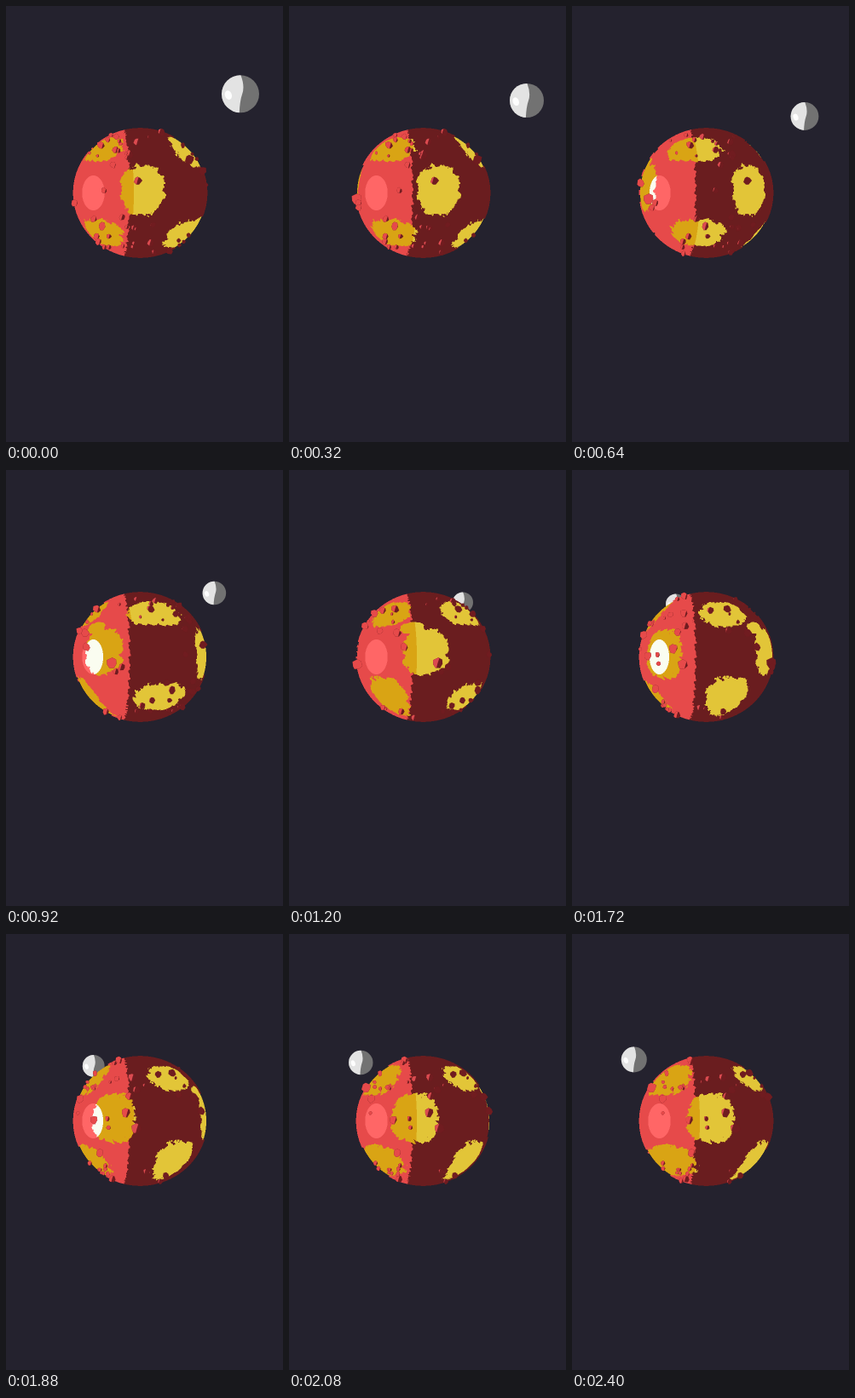
These frames come from a looping animation (325x512 px, 2.44 s). An HTML page with a canvas:

```html
<!DOCTYPE html>
<html lang="en">
<head>
<meta charset="utf-8">
<title>Red planet</title>
<style>
html, body { margin: 0; width: 100%; height: 100%; overflow: hidden; background: #24222e; }
canvas { display: block; width: 325px; height: 512px; }
</style>
</head>
<body>
<canvas id="stage" width="325" height="512"></canvas>
<script>
const LOOP = 2440, STEP = 40, DEG = Math.PI / 180;
const CX = 157.5, CY = 219.5, RX = 77.5, RY = 75;
const ctx = document.getElementById('stage').getContext('2d');

// time, planet yaw, moon x, moon y, moon radius
const keys = [
  [0, 0, 275, 103.3, 22],
  [320, 12, 279, 111, 20],
  [640, 41, 273, 129.5, 16.4],
  [1200, 114, 204, 155.5, 12],
  [1720, 181, 122, 157.5, 12],
  [2080, 216, 84.3, 151, 14.2],
  [2400, 228, 72.8, 147.5, 15]
];

// yellow seas: longitude, latitude, half width, half height
const seas = [
  [2, 3, 19, 23], [-112, 5, 20, 21], [-224, 3, 21, 22],
  [-57, 45, 34, 15], [78, 42, 34, 18], [-160, 44, 29, 15], [-283, 44, 33, 17],
  [-125, 27, 12, 6],
  [-52, -40, 31, 16], [64, -42, 31, 17], [-157, -42, 24, 24], [-273, -40, 33, 18]
];

// longitude, latitude, size
const bigRocks = [
  [-2, 11, 5.5], [-33, 2, 4], [60, 31, 6], [-27, 26, 4], [-30, 42, 4.5],
  [-5, 52, 4.5], [-12, 37, 5], [-42, -31, 5], [-50, -24, 4], [-6, -33, 4.5],
  [14, -51, 4], [-17, -22, 4], [-101, -6, 7], [-92, -9, 4], [88, 20, 5],
  [-48, 61, 4], [-62, 48, 5], [-62, -42, 4], [-98, -13, 4], [-153, 48, 5],
  [-139, 22, 5.5], [-159, 24, 4.5], [-131, 9, 5], [-73, -49, 4], [-211, 7.5, 6],
  [-228, 2, 3], [-227, -6, 3], [-243, 1, 5], [-202, -7, 6.5], [-209, 23, 4.5],
  [-202, 29, 5], [-176, 46, 4.5], [-243, -30, 5], [-152, -58, 4], [-226, 41, 3.5],
  [-208, 43, 4.5], [-274, 71, 4.5], [-272, -64, 4.5], [-269, 7, 2.5]
];

let seed = 29;
const rnd = () => (seed = seed * 16807 % 2147483647) / 2147483647;

function makeRock([lon, lat, size]) {
  const pts = [];
  for (let i = 0; i < 7; i++) {
    const a = i / 7 * Math.PI * 2 + rnd() * .4, r = size * (.8 + rnd() * .35);
    pts.push([Math.cos(a) * r * .88, Math.sin(a) * r]);
  }
  return { lon, lat, size, pts, bias: rnd() * .4 - .2 };
}

const rocks = bigRocks.map(makeRock);
for (let i = 0; i < 46; i++) {
  const lat = (28 + rnd() * 42) * (i % 2 ? 1 : -1);
  rocks.push(makeRock([rnd() * 360, lat, 1.8 + rnd() * 1.5]));
}

// Cubic interpolation through the key table
const slope = (i, k) => (keys[i + 1][k] - keys[i][k]) / (keys[i + 1][0] - keys[i][0]);
function tangent(i, k) {
  const last = keys.length - 1;
  if (i === 0) return 1.5 * slope(0, k) - .5 * tangent(1, k);
  if (i === last) return 1.5 * slope(last - 1, k) - .5 * tangent(last - 1, k);
  const a = keys[i][0] - keys[i - 1][0], b = keys[i + 1][0] - keys[i][0];
  return (slope(i - 1, k) * b + slope(i, k) * a) / (a + b);
}
function track(t, k) {
  let i = 0;
  while (i < keys.length - 2 && t >= keys[i + 1][0]) i++;
  const h = keys[i + 1][0] - keys[i][0], s = (t - keys[i][0]) / h, r = 1 - s;
  return keys[i][k] * (1 + 2 * s) * r * r + keys[i + 1][k] * s * s * (3 - 2 * s)
    + h * (tangent(i, k) * s * r * r - tangent(i + 1, k) * s * s * r);
}

// Land map, two cells per degree
const land = new Uint8Array(720 * 360);
const wrap = d => ((d % 360) + 540) % 360 - 180;
for (let y = 0; y < 360; y++) {
  for (let x = 0; x < 720; x++) {
    const lon = x / 2, lat = 90 - y / 2, a = lon * DEG, b = lat * DEG;
    const rough = .08 * Math.sin(9 * a + 5 * Math.sin(8 * b))
      + .07 * Math.sin(23 * b + 4 * Math.sin(13 * a))
      + .05 * Math.sin(41 * a + 3 * Math.sin(37 * b))
      + .04 * Math.sin(67 * b + 3 * Math.sin(53 * a));
    const wet = seas.some(([u, v, w, h]) =>
      Math.abs(wrap(lon - u) / w) ** 2.6 + Math.abs((lat - v) / h) ** 2.6 < 1 + rough * 1.6);
    land[y * 720 + x] = wet ? 0 : 1;
  }
}
function isLand(lon, lat) {
  const x = Math.floor((((lon / DEG) % 360) + 360) % 360 * 2) % 720;
  const y = Math.min(359, Math.floor((90 - lat / DEG) * 2));
  return land[y * 720 + x];
}

// The globe is shaded at double size and drawn at half size
const N = 328, globe = document.createElement('canvas');
globe.width = globe.height = N;
const gctx = globe.getContext('2d');
const image = gctx.createImageData(N, N);
const pixels = new Uint32Array(image.data.buffer);
const abgr = h => (0xff000000 | (h & 255) << 16 | (h & 0xff00) | h >> 16) >>> 0;
const LAND = [0xff6666, 0xe64a4a, 0x6a1d1f].map(abgr);
const SEA = [0xfafdf0, 0xd9a414, 0xe2c538].map(abgr);

function shadeGlobe(yaw) {
  for (let j = 0; j < N; j++) {
    const py = (j + .5 - N / 2) / 2;
    for (let i = 0; i < N; i++) {
      const px = (i + .5 - N / 2) / 2, p = j * N + i;
      let u = px / RX, v = -py / RY, q = u * u + v * v;
      pixels[p] = 0;
      if (q > 1.035) continue;
      const rim = q > 1;
      if (rim) { q = Math.sqrt(q); u /= q; v /= q; q = 1; }
      const lon = Math.atan2(u, Math.sqrt(1 - q)) - yaw, lat = Math.asin(v);
      const dry = isLand(lon, lat);
      if (rim && !dry) continue;
      const w = Math.sqrt(1 - v * v);
      const edge = dry
        ? -20.5 + 8 * w + Math.sin(lat * 31 + 3 * Math.sin(lon * 17)) + .6 * Math.sin(lat * 83 + lon * 9)
        : -22.5 + 15 * w;
      const glow = ((px + 55) / (dry ? 13.2 : 11.5)) ** 2 + (py / 20.5) ** 2 < 1;
      pixels[p] = (dry ? LAND : SEA)[glow ? 0 : px < edge ? 1 : 2];
    }
  }
  gctx.putImageData(image, 0, 0);
}

function drawRock(rock, yaw) {
  const lon = rock.lon * DEG + yaw, lat = rock.lat * DEG;
  const w = Math.cos(lat), u = Math.sin(lon) * w, z = Math.cos(lon) * w;
  if (z < -.06) return;
  ctx.save();
  ctx.translate(CX + u * RX * 1.01, CY - Math.sin(lat) * RY * 1.01);
  ctx.beginPath();
  rock.pts.forEach(([x, y]) => ctx.lineTo(x, y));
  ctx.closePath();
  ctx.fillStyle = '#701c20';
  ctx.fill();
  ctx.clip();
  const s = rock.size, lit = Math.max(0, Math.min(1, .42 - u * .6 + rock.bias));
  const x = -1.2 * s + 2.4 * s * lit;
  ctx.fillStyle = u < -.15 ? '#e64a4a' : '#dc4b50';
  ctx.beginPath();
  ctx.moveTo(-2 * s, -2 * s);
  ctx.lineTo(x + s * .4, -1.2 * s);
  ctx.lineTo(x, 0);
  ctx.lineTo(x - s * .3, 1.2 * s);
  ctx.lineTo(-2 * s, 2 * s);
  ctx.fill();
  ctx.restore();
}

function drawMoon(x, y, r) {
  ctx.save();
  ctx.translate(x, y);
  ctx.scale(r, r);
  ctx.beginPath();
  ctx.arc(0, 0, 1, 0, Math.PI * 2);
  ctx.fillStyle = '#727272';
  ctx.fill();
  ctx.clip();
  ctx.fillStyle = '#e3e3e3';
  ctx.beginPath();
  ctx.moveTo(-1.1, -1.1);
  ctx.lineTo(-.02, -1.1);
  ctx.quadraticCurveTo(.26, -.45, .1, 0);
  ctx.quadraticCurveTo(-.04, .4, -.06, 1.1);
  ctx.lineTo(-1.1, 1.1);
  ctx.fill();
  ctx.fillStyle = '#fdfdfd';
  ctx.beginPath();
  ctx.ellipse(-.64, .06, .18, .25, -.35, 0, Math.PI * 2);
  ctx.fill();
  ctx.restore();
}

function draw(t) {
  const yaw = track(t, 1) * DEG;
  ctx.fillStyle = '#24222e';
  ctx.fillRect(0, 0, 325, 512);
  drawMoon(track(t, 2), track(t, 3), track(t, 4));
  shadeGlobe(yaw);
  ctx.drawImage(globe, CX - N / 4, CY - N / 4, N / 2, N / 2);
  rocks.forEach(rock => drawRock(rock, yaw));
}

const start = performance.now();
let shown = -1;
function tick() {
  const t = Math.floor((performance.now() - start) % LOOP / STEP) * STEP;
  if (t !== shown) draw(shown = t);
  requestAnimationFrame(tick);
}
tick();
</script>
</body>
</html>
```
